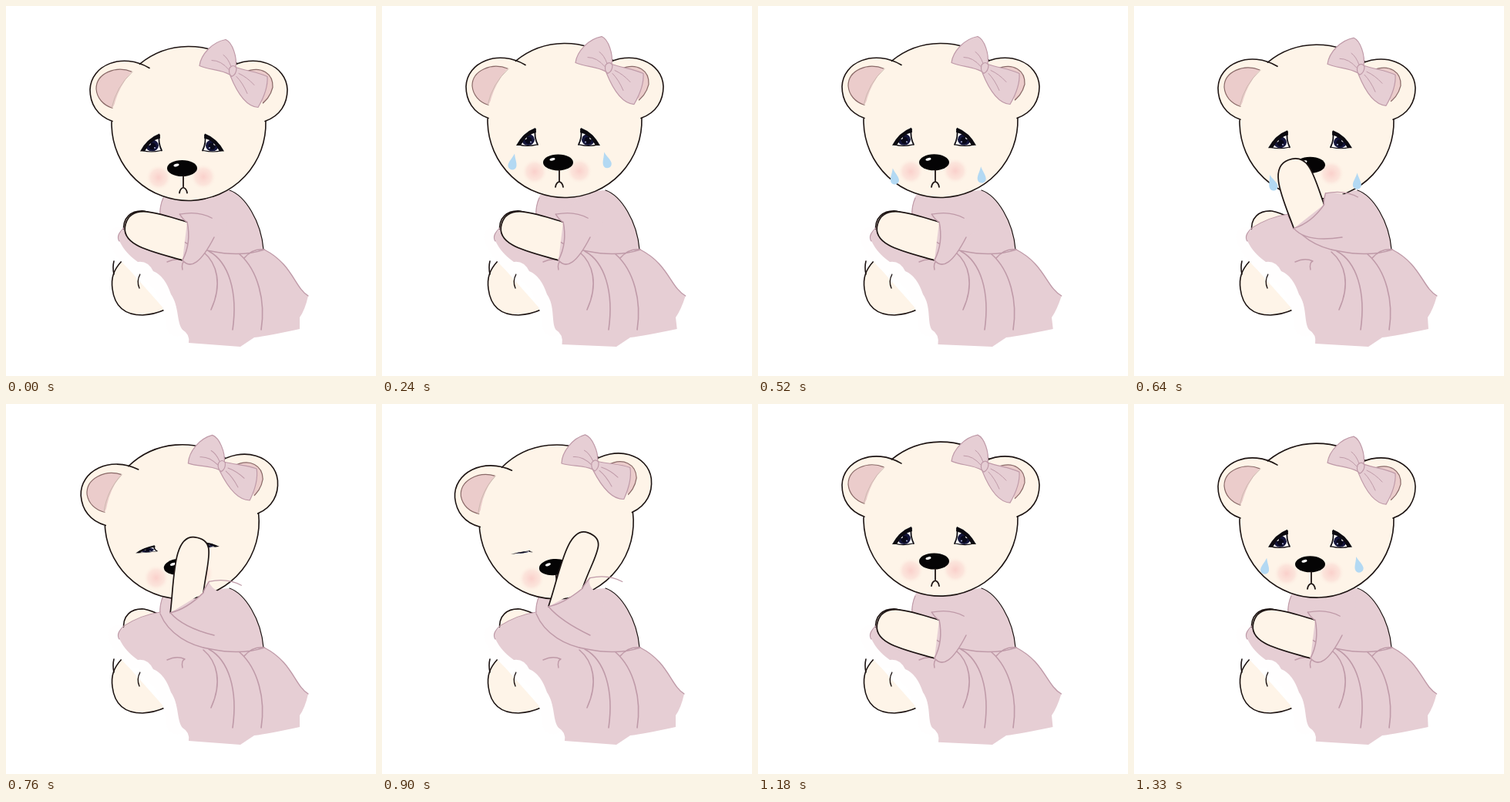
Animation, 480 px wide and 480 px high, one loop 1.36 s. Source, as an HTML page with a canvas:

```html
<!DOCTYPE html>
<html lang="en">
<head>
<meta charset="utf-8">
<style>
html, body { margin: 0; width: 100%; height: 100%; overflow: hidden; background: #fff; }
canvas { display: block; width: 100vmin; height: 100vmin; }
</style>
</head>
<body>
<canvas id="stage" width="480" height="480"></canvas>
<script>
const ctx = document.getElementById('stage').getContext('2d');
const LOOP = 1360, DEG = Math.PI / 180;
const CREAM = '#fef4e8', INK = '#1d1413', PINK = '#e6ced4', MAUVE = '#bf9aa8', EAR = '#ebcccb', TEAR = '#b3d9f3';

const lerp = (a, b, k) => a + (b - a) * k;
const clamp = k => Math.min(1, Math.max(0, k));

// Eased 0 to 1 while t runs from one time to another.
function ramp(t, from, to) {
  const k = clamp((t - from) / (to - from));
  return k * k * (3 - 2 * k);
}

const asPath = p => typeof p === 'string' ? new Path2D(p) : p;
function fill(p, color) {
  ctx.fillStyle = color;
  ctx.fill(asPath(p));
}
function line(p, color = INK, width = 1.6) {
  ctx.strokeStyle = color;
  ctx.lineWidth = width;
  ctx.stroke(asPath(p));
}
function shape(p, color, edge, width) {
  fill(p, color);
  line(p, edge, width);
}
function oval(x, y, rx, ry, color, turn = 0) {
  const p = new Path2D();
  p.ellipse(x, y, rx, ry, turn, 0, 7);
  fill(p, color);
}
function group(draw) {
  ctx.save();
  draw();
  ctx.restore();
}
// Draws once as is and once flipped about the axis x.
function mirrored(x, draw) {
  group(draw);
  group(() => {
    ctx.translate(2 * x, 0);
    ctx.scale(-1, 1);
    draw();
  });
}

function drawBody(bob) {
  const out = 3.5 * bob, low = 2 * bob;

  // Foot, frill and far paw
  shape('M150 331C140 342 136 352 138 367C141 391 156 401 177 401Q193 400 206 394', CREAM);
  line('M140 331Q138 339 140 348');
  line('M174 348Q169 357 173 366', INK, 1.4);
  line('M146 300Q152 316 166 329Q184 328 188 346Q204 354 209 372Q220 390 222 415', '#fffefe', 27);
  shape('M153 294C150 274 163 265 179 266C189 268 195 271 201 274', CREAM);

  // Torso
  fill('M205 245Q197 262 200 278L215 310L265 330L334 316C331 279 310 247 290 239Z', PINK);
  line('M204 249Q199 260 200 273', MAUVE, 1.2);
  line('M290 239C310 246 331 279 334 316', INK, 1.2);

  // Skirt
  const side = `M335 316C372 335 374 365 ${392 + out / 2} 376`;
  fill(`M145 299C154 284 176 275 200 270C215 302 245 318 266 318Q305 326 335 316
    ${side.replace('M335 316', '')}Q388 394 381 404L${381 + out / 2} 419
    Q340 428 322 430L304 442L${237 - out} ${437 + low}
    Q${239 - out} 426 ${229 - out} 420C${221 - out / 2} 410 225 390 214 374
    Q206 350 191 344Q184 330 171 332Q151 318 145 299Z`, PINK);
  line('M147 305Q142 298 153 288Q174 274 200 270', MAUVE, 1.2);
  line(side, MAUVE, 1.4);
  line('M200 272C211 299 239 314 266 318Q305 326 335 316', MAUVE, 1.4);
  line('M209 332Q222 326 232 331Q227 333 229 342', MAUVE, 1.4);
  line('M256 319C274 334 281 361 266 394', MAUVE, 1.6);
  line('M263 318C289 332 301 371 294 420', MAUVE, 1.6);
  line('M303 322C327 343 337 383 331 420', MAUVE, 1.6);
  line('M309 327Q320 314 335 316', MAUVE, 1.5);
}

function drawEye(lid) {
  ctx.translate(0, 188);
  ctx.scale(1, lid);
  ctx.translate(0, -188);
  fill('M177 187Q184 172 198 168L201 187Q188 191 177 187Z', '#fff');
  oval(189.5, 180.5, 8.5, 7.5, '#15163c');
  oval(190, 181.5, 4.5, 4.5, '#080818');
  oval(186, 178.5, 1.8, 1.8, '#fff');
  oval(193, 183.5, 1, 1, '#aab1dd');
  fill('M174 188Q183 171 199 165L200 171Q187 174 180 188Z', '#0c0a10');
  line('M199 167Q197 177 202 187', '#0c0a10', 1.8);
  line('M177 187Q188 190 201 187', '#0c0a10', 1.2);
}

function drawCheek(x, y) {
  const glow = ctx.createRadialGradient(x, y, 1, x, y, 17);
  glow.addColorStop(0, 'rgba(248,192,190,.65)');
  glow.addColorStop(.6, 'rgba(249,205,200,.4)');
  glow.addColorStop(1, 'rgba(254,244,232,0)');
  oval(x, y, 17, 17, glow);
}

function drawFace(lid) {
  drawCheek(198, 222);
  drawCheek(256, 221);
  mirrored(228.5, () => drawEye(lid));
  oval(228.5, 210, 19.5, 10.5, '#050405');
  oval(221, 206, 3.6, 1.7, '#fff', -.25);
  line('M230 220V234M225 242Q226 236 230 235Q234 236 235 242', INK, 1.8);
}

function drawBow() {
  shape('M291 89C278 81 264 83 251 77C253 62 268 46 285 43C294 47 300 66 298 79Z', PINK, MAUVE, 1.2);
  shape('M298 79C313 84 327 85 339 91C340 105 334 119 327 131C311 130 299 110 291 90Z', PINK, MAUVE, 1.2);
  line('M289 82Q279 70 267 70M292 78Q288 67 282 63M299 91Q307 99 313 113M302 87Q313 92 322 102', MAUVE, 1);
  shape('M290 80Q295 74 299 80Q299 88 293 91Q288 88 290 80Z', PINK, MAUVE, 1.2);
}

function drawHead(bob, tilt, lid) {
  const ear = 'M138 149C118 142 109 126 109 108C110 76 151 59 186 80';
  const earEdge = '#8a6a68';
  ctx.translate(237, 265.5 - 4 * bob);
  ctx.rotate(tilt * DEG);
  ctx.translate(-237, -265);
  mirrored(237, () => fill(ear, CREAM));
  shape('M164 85C142 76 117 87 117 107C118 119 126 128 138 132', EAR, earEdge, 1.2);
  shape('M310 85C332 76 347 88 346 105Q342 121 328 129', EAR, earEdge, 1.2);
  oval(237, 152, 99.5, 100.5, CREAM);
  line('M137 132Q143 104 164 85', '#cdb9b0', 1);
  mirrored(237, () => line(ear));
  const rim = new Path2D();
  rim.arc(237, 152, 100, -2.26, -.9);
  rim.moveTo(337, 149);
  rim.arc(237, 152, 100, -.03, Math.PI + .02);
  line(rim);
  group(() => {
    ctx.translate(0, -3.7 * bob);
    drawFace(lid);
  });
  drawBow();
}

function drawTear(x, y, turn, size) {
  ctx.translate(x, y);
  ctx.rotate(turn);
  ctx.scale(size, size);
  fill('M0 -11C2 -4 5.5 0 5.5 5C5 12 -5 12 -5.5 5C-5.5 0 -2 -4 0 -11Z', TEAR);
}

// Both tears swell, slide down at a steady rate and fade.
function drawTears(age, top) {
  if (age < 0 || age > 620) return;
  const y = top + .068 * age, size = clamp(.15 + age / 130);
  group(() => {
    ctx.globalAlpha = clamp((620 - age) / 90);
    group(() => drawTear(167 + .024 * age, y, .35 - .0013 * age, size));
    group(() => drawTear(291.5 - .004 * age, y - 2, -.35 + .0007 * age, size));
  });
}

// The cuff sits at x, y; the paw points along one angle, the cuff edge along another.
const restArm = { x: 232, y: 305, paw: -164, reach: 80, cuff: -83 };
const raisedArm = { x: 227, y: 273, paw: -110, reach: 78, cuff: -38 };
const highArm = { x: 227, y: 273, paw: -98, reach: 89, cuff: -38 };
const wipingArm = { x: 238, y: 251, paw: -71, reach: 89, cuff: -28 };

function blend(a, b, k) {
  return Object.fromEntries(Object.keys(a).map(name => [name, lerp(a[name], b[name], k)]));
}

function armPose(t) {
  const lifted = blend(raisedArm, highArm, ramp(t, 800, 900));
  const wiping = blend(lifted, wipingArm, ramp(t, 660, 820) - ramp(t, 910, 1050));
  return blend(restArm, wiping, ramp(t, 530, 640) - ramp(t, 1070, 1180));
}

function drawArm({ x, y, paw, reach, cuff }) {
  const dx = Math.cos(paw * DEG), dy = Math.sin(paw * DEG);
  const ex = Math.cos(cuff * DEG), ey = Math.sin(cuff * DEG);
  const along = (px, py, d, side = 0) => [px + dx * d - dy * side, py + dy * d + dx * side];
  const upper = [x + ex * 25, y + ey * 25], lower = [x - ex * 25, y - ey * 25];
  const tip = along(x, y, reach);

  const hand = new Path2D();
  hand.moveTo(...upper);
  hand.bezierCurveTo(...along(...upper, reach * .5), ...along(...tip, 0, 29), ...tip);
  hand.bezierCurveTo(...along(...tip, 0, -29), ...along(...lower, reach * .5), ...lower);
  shape(hand, CREAM, INK, 1.7);

  const puff = along(upper[0] + ex * 7, upper[1] + ey * 7, 11);
  const cuffEdge = [x - dx * 9, y - dy * 9];
  const cuffLine = new Path2D(), under = new Path2D(), sleeve = new Path2D();
  cuffLine.moveTo(...lower);
  cuffLine.quadraticCurveTo(...cuffEdge, ...upper);
  cuffLine.quadraticCurveTo(upper[0] + dx * 4, upper[1] + dy * 4, ...puff);
  under.moveTo(...lower);
  under.quadraticCurveTo(lower[0] + 16, lower[1] + 19, 270, 300);
  sleeve.addPath(cuffLine);
  sleeve.quadraticCurveTo(265, 240, 288, 250);
  sleeve.lineTo(285, 292);
  sleeve.lineTo(270, 300);
  sleeve.quadraticCurveTo(lower[0] + 16, lower[1] + 19, ...lower);
  fill(sleeve, PINK);
  line(cuffLine, MAUVE, 1.5);
  line(under, MAUVE, 1.5);
  const top = new Path2D();
  top.moveTo(...puff);
  top.quadraticCurveTo(puff[0] + 24, puff[1] - 5, puff[0] + 42, puff[1] + 5);
  line(top, MAUVE, 1.2);
}

function render(t) {
  const bob = ramp(t, 120, 250) - ramp(t, 520, 780) + .9 * ramp(t, 1080, 1200) - .55 * ramp(t, 1200, 1330);
  const tilt = -5.5 * (ramp(t, 660, 800) - ramp(t, 1060, 1180));
  const lid = 1 - .9 * (ramp(t, 690, 800) - ramp(t, 930, 1040));
  ctx.fillStyle = '#fff';
  ctx.fillRect(0, 0, 480, 480);
  ctx.lineCap = ctx.lineJoin = 'round';
  drawBody(bob);
  group(() => drawHead(bob, tilt, lid));
  drawTears(t - 120, 194);
  drawTears(t - 1190, 201);
  drawArm(armPose(t));
}

const start = performance.now();
function tick() {
  render((performance.now() - start) % LOOP);
  requestAnimationFrame(tick);
}
tick();
</script>
</body>
</html>
```
